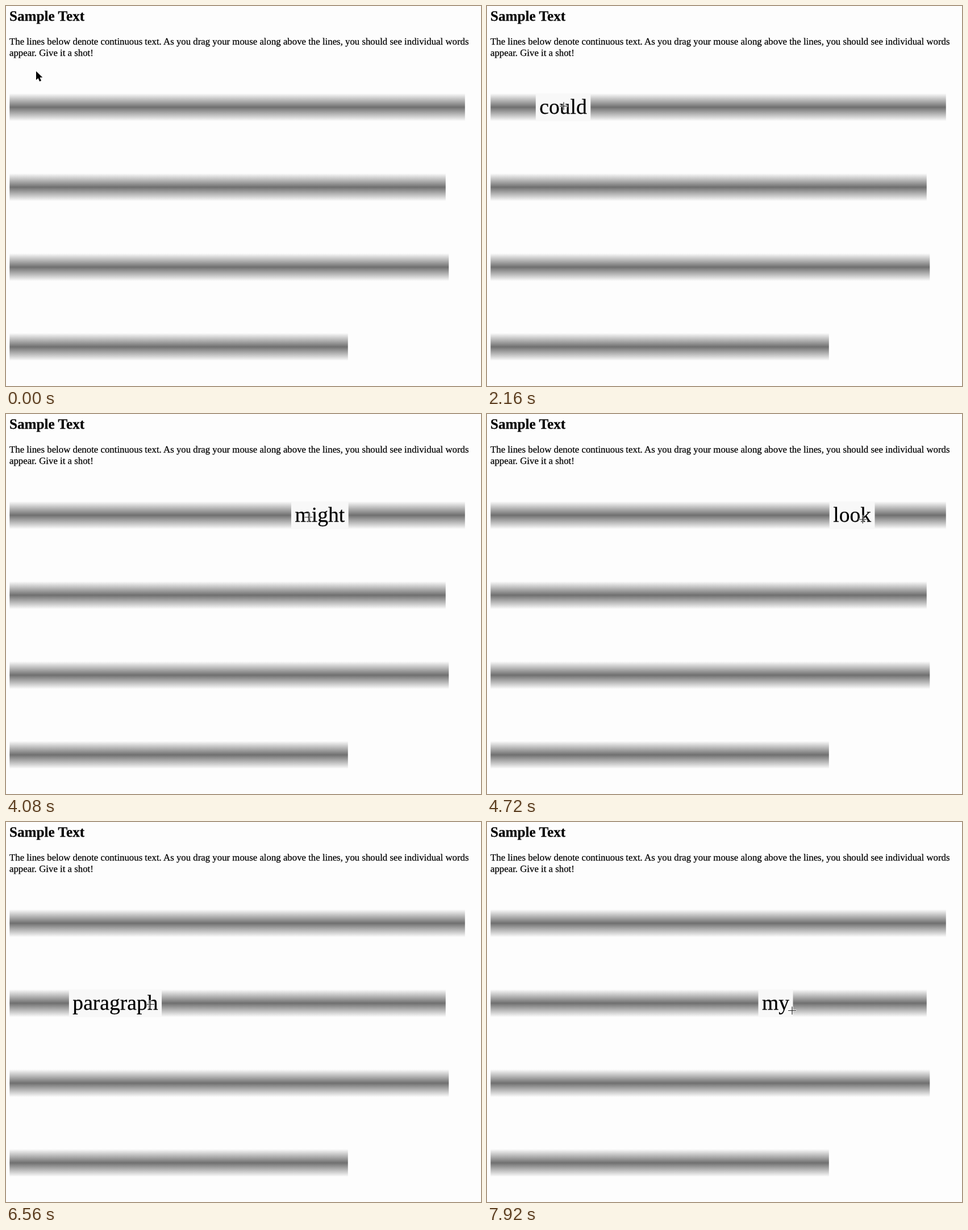
An HTML page that plays this animation: 836 by 670 pixels, repeating every 8000 ms.

```html
<!DOCTYPE html>
<html lang="en">
<head>
<meta charset="utf-8">
<title>Sample Text</title>
<style>
  html, body { margin: 0; width: 100%; height: 100%; overflow: hidden; background: #fdfdfd; }
  svg { display: block; width: 836px; height: 670px; }
  text { font-family: "Liberation Serif", Times, serif; text-rendering: geometricPrecision; stroke: #000; stroke-width: .25px; }
  .title { font-size: 25.2px; font-weight: bold; }
  .intro { font-size: 16.81px; }
  .word { font-size: 37.6px; }
</style>
</head>
<body>
<svg viewBox="0 0 836 670">
  <defs>
    <linearGradient id="blur" x2="0" y2="1">
      <stop offset="0" stop-color="#fdfdfd"/>
      <stop offset=".5" stop-color="#707070"/>
      <stop offset="1" stop-color="#fdfdfd"/>
    </linearGradient>
  </defs>
  <text class="title" x="6" y="26">Sample Text</text>
  <text class="intro" x="6" y="68">The lines below denote continuous text. As you drag your mouse along above the lines, you should see individual words</text>
  <text class="intro" x="6" y="87.5">appear. Give it a shot!</text>

  <g fill="url(#blur)">
    <rect x="6.3" y="154" width="801.5" height="49"/>
    <rect x="6.3" y="295" width="767.5" height="49"/>
    <rect x="6.3" y="436" width="773" height="49"/>
    <rect x="6.3" y="576.5" width="595.5" height="49"/>
  </g>

  <g id="reveal">
    <rect height="49" fill="#f8f8f8"/>
    <text class="word" x="6.5" y="36"></text>
  </g>

  <path id="arrow" d="M0 0V15.5L3.6 12.2L6.1 18L9 16.8L6.5 11.1H11.3Z"
        stroke="#fff" stroke-width="1.2" paint-order="stroke"/>
  <g id="cross" fill="none">
    <path d="M-7.5 0H7.5M0-7.5V7.5" stroke="#fff" stroke-opacity=".75" stroke-width="3"/>
    <path d="M-7 0H7M0-7V7" stroke="#222" stroke-width="1.2"/>
  </g>
</svg>
<script>
  const LOOP = 8000, STEP = 80, LEFT = 6, LINE_HEIGHT = 49, PADDING = 6.5;
  const [reveal, arrow, cross] = ["reveal", "arrow", "cross"].map(id => document.getElementById(id));
  const [box, label] = reveal.children;

  // Set the words side by side, each as wide as its text plus padding.
  function layLine(top, sentence) {
    let right = LEFT;
    return sentence.split(" ").map(text => {
      label.textContent = text;
      const left = right, width = label.getComputedTextLength() + 2 * PADDING;
      right += width;
      return { text, left, top, width };
    });
  }

  const words = [
    ...layLine(154, "This could be a test that shows might look along a"),
    ...layLine(295, "whole paragraph from around my")
  ];

  // Pointer strokes: start, end, target x and y; it rests in between.
  const strokes = [
    [0, 1120, 30, 149],
    [1120, 1440, 22, 100],
    [1600, 1840, 30, 165],
    [1840, 2480, 240, 188],
    [2800, 3040, 321, 187.5],
    [3040, 4080, 532.5, 182],
    [4080, 5360, 790, 190],
    [5360, 5440, 715.5, 209.5],
    [5440, 5600, 237, 233],
    [5600, 5920, 6, 348],
    [6400, 6560, 254, 321.5],
    [6560, 7280, 465, 325],
    [7440, 7920, 537, 332.5]
  ];

  function pointerAt(time) {
    let x = 53, y = 115;
    for (const [start, end, toX, toY] of strokes) {
      const k = Math.min(1, Math.max(0, (time - start) / (end - start)));
      x += (toX - x) * k;
      y += (toY - y) * k;
    }
    return { x, y };
  }

  const wordAt = ({ x, y }) => words.find(word =>
    x >= word.left && x < word.left + word.width &&
    y >= word.top && y <= word.top + LINE_HEIGHT);

  // A word stays open until the pointer reaches another one.
  let open;
  const poses = Array.from({ length: LOOP / STEP }, (_, i) => {
    const pointer = pointerAt(i * STEP);
    open = wordAt(pointer) || open;
    return { ...pointer, word: open };
  });

  const move = (node, x, y) => node.setAttribute("transform", `translate(${x} ${y})`);
  const show = (node, visible) => node.setAttribute("visibility", visible ? "visible" : "hidden");

  function draw(time) {
    const { x, y, word } = poses[Math.floor((time % LOOP) / STEP)];
    move(arrow, x, y);
    move(cross, x, y);
    show(arrow, !word);
    show(cross, word);
    show(reveal, word);
    if (word) {
      move(reveal, word.left, word.top);
      box.setAttribute("width", word.width);
      label.textContent = word.text;
    }
  }

  const start = performance.now();
  function tick() {
    draw(performance.now() - start);
    requestAnimationFrame(tick);
  }
  tick();
</script>
</body>
</html>
```
